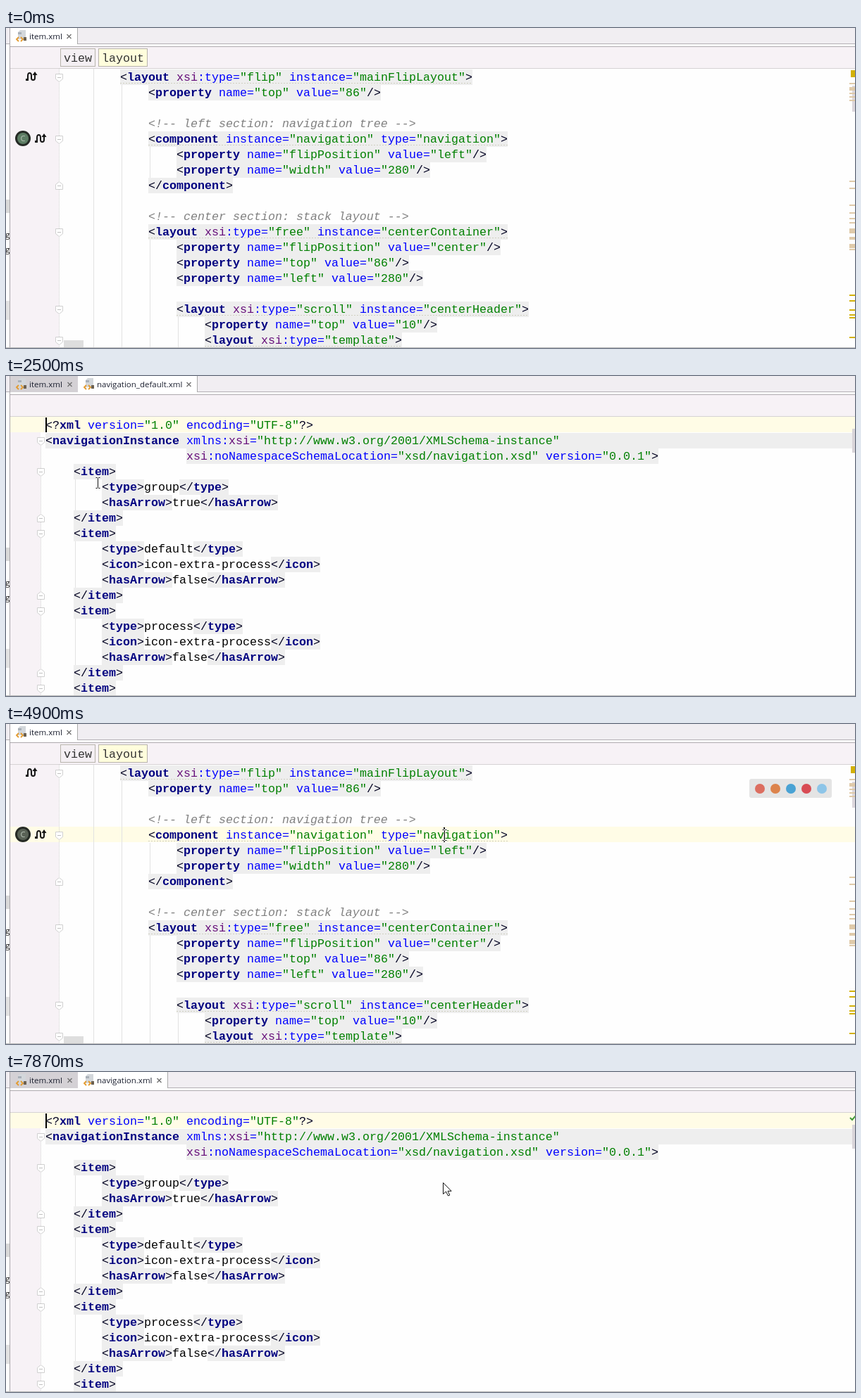
These frames come from a looping animation (1205 by 455 pixels, 8 s). An HTML page with a canvas:

```html
<!DOCTYPE html>
<html lang="en">
<head>
<meta charset="utf-8">
<title>XML editor navigation</title>
<style>
  html, body { margin: 0; width: 100%; height: 100%; overflow: hidden; background: #fff; }
  canvas { display: block; }
</style>
</head>
<body>
<canvas id="stage" width="1205" height="455"></canvas>
<script>
const LOOP = 8000, ROW = 22, TOP = 59, CHAR = 10, RIGHT = 1205, BOTTOM = 454;
const c = document.getElementById('stage').getContext('2d');
const MONO = '16.66px "Liberation Mono", monospace';
const UI = '11.5px "Open Sans", sans-serif';
const GREY = '#eeeeee', BAND = '#fffce6', GUTTER = '#f7f2f6', EDITOR = '#fefefe';

const layoutDoc = {
  x: 162, fold: 75,
  lines: `<layout xsi:type="flip" instance="mainFlipLayout">
    <property name="top" value="86"/>

    <!-- left section: navigation tree -->
    <component instance="navigation" type="navigation">
        <property name="flipPosition" value="left"/>
        <property name="width" value="280"/>
    </component>

    <!-- center section: stack layout -->
    <layout xsi:type="free" instance="centerContainer">
        <property name="flipPosition" value="center"/>
        <property name="top" value="86"/>
        <property name="left" value="280"/>

        <layout xsi:type="scroll" instance="centerHeader">
            <property name="top" value="10"/>
            <layout xsi:type="template">`.split('\n'),
  guides: [[124, 58, 454], [164, 81, 454], [204, 169, 213], [204, 301, 454], [244, 411, 454]],
  opens: [70, 158, 290, 400, 444], closes: [224]
};

const item = (type, icon, arrow) => [
  '    <item>', `        <type>${type}</type>`,
  ...(icon ? [`        <icon>${icon}</icon>`] : []),
  `        <hasArrow>${arrow}</hasArrow>`, '    </item>'
];
const navDoc = {
  x: 56, fold: 49,
  lines: [
    '<?xml version="1.0" encoding="UTF-8"?>',
    '<navigationInstance xmlns:xsi="http://www.w3.org/2001/XMLSchema-instance"',
    ' '.repeat(20) + 'xsi:noNamespaceSchemaLocation="xsd/navigation.xsd" version="0.0.1">',
    ...item('group', '', true),
    ...item('default', 'icon-extra-process', false),
    ...item('process', 'icon-extra-process', false),
    '    <item>'
  ],
  guides: [[98, 147, 191], [98, 235, 301], [98, 345, 411]],
  opens: [92, 136, 224, 334, 444], closes: [202, 312, 422]
};

// time, x, y, pointer shape
const pointerSteps = [
  [0, 0, 0, ''], [450, 1022, 445, 'beam'], [530, 829, 411, 'beam'], [690, 520, 300, 'beam'],
  [770, 385, 254, 'beam'], [1000, 355, 250, 'beam'], [1080, 290, 240, 'beam'],
  [1160, 220, 226, 'beam'], [1240, 177, 215, 'beam'], [1400, 120, 196, 'beam'],
  [1480, 60, 178, 'arrow'], [1560, 26, 161, 'arrow'], [1790, 24, 161, 'hand'],
  [2130, 21, 158, 'hand'], [2420, 25, 160, 'arrow'], [2500, 130, 152, 'beam'],
  [2580, 270, 142, 'beam'], [2660, 410, 132, 'beam'], [2740, 530, 123, 'beam'],
  [2820, 620, 118, 'beam'], [2890, 653, 116, 'beam'], [3040, 600, 104, 'beam'],
  [3120, 460, 76, 'beam'], [3200, 320, 48, 'arrow'], [3280, 251, 28, 'arrow'],
  [3360, 258, 10, 'arrow'], [4160, 330, 40, 'arrow'], [4240, 420, 90, 'beam'],
  [4320, 510, 140, 'beam'], [4400, 580, 180, 'beam'], [4480, 603, 194, 'beam'],
  [4680, 614, 174, 'beam'], [4760, 622, 158, 'beam'], [7130, 620, 157, 'arrow']
];
const toolbarSteps = [
  [0, 0], [1000, .3], [1080, .5], [1160, .75], [1240, 1], [2280, 0],
  [4680, .3], [4760, .5], [4900, .8], [5020, 1], [7210, 0]
];
const spinnerSteps = [[0, 0], [7210, 1], [7490, 4], [7590, 5]];
const at = (steps, t) => steps.filter(s => s[0] <= t).pop();

function box(x, y, w, h, fill) { c.fillStyle = fill; c.fillRect(x, y, w, h); }
function frame(x, y, w, h, fill, stroke) {
  box(x, y, w, h, fill);
  c.strokeStyle = stroke; c.lineWidth = 1;
  c.strokeRect(x + .5, y + .5, w - 1, h - 1);
}
function text(s, x, y, font, color) { c.font = font; c.fillStyle = color; c.fillText(s, x, y); }
function disc(x, y, r, fill) { c.fillStyle = fill; c.beginPath(); c.arc(x, y, r, 0, 7); c.fill(); }
function shape(d, x, y, fill, stroke, width = 1) {
  const p = new Path2D(d);
  c.save(); c.translate(x, y);
  if (fill) { c.fillStyle = fill; c.fill(p); }
  if (stroke) { c.strokeStyle = stroke; c.lineWidth = width; c.stroke(p); }
  c.restore();
}

// Colours one line of XML; a line always begins inside a tag.
function tokens(line) {
  const list = [], re = /<!--.*-->|<\?|<\/?|\/?>|\?>|"[^"]*"|\s+|\bxsi\b|:?[\w.-]+:?|=/g;
  let tag = true, named = false;
  for (const m of line.matchAll(re)) {
    const s = m[0], tok = { s, col: m.index, color: '#0000ff', style: '', tag: true };
    if (s.startsWith('<!--')) Object.assign(tok, { color: '#808080', style: 'italic ', tag: false });
    else if (s[0] === '<') { tag = true; named = true; tok.color = '#000020'; }
    else if (s.endsWith('>')) { tag = false; tok.color = '#000020'; }
    else if (!s.trim()) tok.tag = tag && m.index > 0;
    else if (!tag) { tok.color = '#000'; tok.tag = false; }
    else if (s[0] === '"') tok.color = '#008000';
    else if (named) { named = false; tok.color = '#000080'; tok.style = 'bold '; }
    else if (s === 'xsi') tok.color = '#660e7a';
    list.push(tok);
  }
  return list;
}
for (const doc of [layoutDoc, navDoc]) doc.tokens = doc.lines.map(tokens);

function foldMark(x, y, up) {
  const k = up ? -1 : 1;
  shape(`M-5,${-5 * k}H5V${2 * k}L0,${6 * k}L-5,${2 * k}Z`, x + .5, y + .5, '#fff', '#d0d0d0');
  box(x - 2, y, 5, 1, '#c0c0c0');
}

function drawDoc(doc, v) {
  box(6, 58, doc.fold - 6, 396, GUTTER);
  box(doc.fold, 58, RIGHT - doc.fold, 396, EDITOR);
  if (v.band >= 0) box(6, TOP + v.band * ROW - 1, RIGHT - 6, ROW, BAND);
  doc.tokens.forEach((row, i) => {
    const y = TOP + i * ROW;
    if (i !== v.band) for (const k of row)
      if (k.tag) box(doc.x + k.col * CHAR, y, k.s.length * CHAR, ROW, GREY);
  });
  if (doc === navDoc) box(785, 81, RIGHT - 785, ROW, GREY);
  if (v.guides) for (const [x, a, b] of doc.guides) box(x, a, 1, b - a, '#e2e2e2');
  for (const [x, y, w, color] of v.marks) box(x, y, w, ROW, color);
  c.strokeStyle = '#d0d0d0'; c.lineWidth = 1; c.setLineDash([1, 1]);
  c.beginPath(); c.moveTo(doc.fold + .5, doc === navDoc ? 92 : 58); c.lineTo(doc.fold + .5, BOTTOM); c.stroke();
  c.setLineDash([]);
  doc.opens.forEach(y => foldMark(doc.fold, y));
  doc.closes.forEach(y => foldMark(doc.fold, y, true));
  doc.tokens.forEach((row, i) => {
    for (const k of row) text(k.s, doc.x + k.col * CHAR, 75 + i * ROW, k.style + MONO, k.color);
    if (doc === layoutDoc && /<(layout|component) /.test(doc.lines[i])) {
      const start = doc.lines[i].search(/\S/);
      c.strokeStyle = '#cfcfc0'; c.setLineDash([2, 2]);
      c.beginPath();
      c.moveTo(doc.x + start * CHAR, 78.5 + i * ROW);
      c.lineTo(doc.x + doc.lines[i].length * CHAR, 78.5 + i * ROW);
      c.stroke(); c.setLineDash([]);
    }
  });
}

function tab(x, w, name, active) {
  box(x, 0, w, 23, active ? '#fff' : '#d4d1d5');
  box(x + w - 1, 0, 1, 23, '#aaa');
  const ix = x + 9;
  shape('M5,0H13V13H2V3Z', ix, 3, '#d3d7db');
  box(ix + 2, 6, 5, 3, '#a9b0b8');
  shape('M4,9L1,12L4,15M7,9L10,12L7,15', ix - 1, 4, '', '#e39a2d', 1.8);
  box(ix + 10, 13, 4, 5, '#6d6252');
  text(name, x + 27, 16, UI, '#1c2030');
  shape('M-3,-3L3,3M3,-3L-3,3', x + w - 12.5, 12, '', '#707070', 1.4);
}

function crumbs(x, list) {
  for (const [name, fill] of list) {
    const w = name.length * CHAR + 10;
    frame(x, 29, w, 26, fill, '#b8b4ac');
    text(name, x + 5, 48, MONO, '#333');
    x += w + 4;
  }
}

function chrome() {
  box(0, 0, RIGHT, 455, '#fff');
  box(0, 0, RIGHT, 23, '#f1eef2');
  box(0, 22, RIGHT, 1, '#b3b0b4');
  box(6, 26, RIGHT - 6, 1, '#aeaaae');
  box(6, 27, RIGHT - 6, 30, GUTTER);
  box(6, 57, RIGHT - 6, 1, '#d6d2d4');
  box(0, 244, 5, 19, '#d9d9d9');
  box(0, 388, 5, 27, '#e2e2e2');
  text('g', -1, 298, UI, '#111');
  text('g', -1, 319, UI, '#111');
  box(5, 0, 1, 455, '#a9a6aa');
}

function gutterArrows(x, y) {
  shape('M-5,5V-1Q-5,-5 -2.5,-5Q0,-5 0,-1V2Q0,5 2.5,5Q5,5 5,2V-3', x, y, '', '#151515', 2);
  shape('M1.5,-2L5,-7L8.5,-2Z', x, y, '#151515');
  box(x - 8, y + 3, 4, 3, '#151515');
}

function classIcon(color) {
  disc(24, 157, 11, '#252a25');
  disc(24, 157, 8, color);
  c.textAlign = 'center';
  text('C', 24, 161, '11px "Open Sans", sans-serif', '#b9c4b8');
  c.textAlign = 'left';
}

function errorStripe() {
  box(1199, 60, 6, 10, '#d3b106');
  box(1201, 82, 4, 37, '#dcd7dc');
  for (const [y, h] of [[78, 2], [84, 5], [92, 2], [97, 2], [102, 2], [217, 2], [227, 2], [251, 2],
    [262, 2], [270, 2], [276, 2], [285, 7], [297, 4], [307, 6], [314, 2]])
    box(1197, y, 8, h, '#dfcaa9');
  for (const y of [379, 387, 400, 407, 411, 439]) box(1197, y, 8, 2, '#d3b106');
}

function browserBar(alpha) {
  c.globalAlpha = alpha;
  c.fillStyle = '#dedede';
  c.beginPath(); c.roundRect(1055, 78, 117, 27, 3); c.fill();
  ['#d9503f', '#d96a26', '#2291d0', '#d42430', '#77bde8']
    .forEach((color, i) => disc(1070 + i * 22, 92, 7, color));
  c.globalAlpha = 1;
}

function bulb(x, y) {
  disc(x + 5.5, y + 5.5, 5.3, '#f0a732');
  disc(x + 4.5, y + 4.5, 2.4, '#f9cd78');
  box(x + 3, y + 10, 5, 2, '#9a8a70');
  box(x + 3, y + 13, 5, 2, '#77716a');
}

function declarationPopup() {
  frame(621, 169, 425, 55, '#fff', '#a5a5a5');
  box(622, 170, 423, 17, '#e6e6e6');
  c.textAlign = 'center';
  text('Choose Declaration', 833, 182, UI, '#222');
  c.textAlign = 'left';
  text('navigation.xml', 630, 200, UI, '#222');
  text('navigation_default.xml', 630, 217, UI, '#222');
}

function spinner(turn) {
  for (let i = 0; i < 12; i++) {
    const a = (i + turn) * Math.PI / 6, shade = 105 + i * 11;
    c.strokeStyle = `rgb(${shade},${shade},${shade})`;
    c.lineWidth = 3.4; c.lineCap = 'round';
    c.beginPath();
    c.moveTo(548 - Math.cos(a) * 8.5, 240 + Math.sin(a) * 8.5);
    c.lineTo(548 - Math.cos(a) * 14, 240 + Math.sin(a) * 14);
    c.stroke();
  }
  c.lineCap = 'butt';
}

function pointer([, x, y, kind]) {
  if (kind === 'arrow') shape('M0,0V16L4,12.5L7,18.5L9.3,17.5L6.6,11.8H11.6Z', x + .5, y + .5, '#fff', '#111');
  if (kind === 'beam') {
    const beam = 'M-3,-7.5H-1L0,-6.5L1,-7.5H3M0,-6.5V6.5M-3,7.5H-1L0,6.5L1,7.5H3';
    shape(beam, x + .5, y, '', '#fff', 2.4);
    shape(beam, x + .5, y, '', '#111');
  }
  if (kind === 'hand') {
    shape('M4,12V2Q4,0 5.5,0Q7,0 7,2V8Q7,6.5 8.5,6.5Q10,6.5 10,8Q10,7 11.5,7Q13,7 13,9' +
      'Q13,8 14.2,8Q15.5,8 15.5,10V14Q15.5,17 13.5,19V21.5H5.5V19L1,13Q0,11 1.2,10.5Q2.5,10 4,12Z', x, y, '#fff', '#111', 1.2);
    shape('M7,8V12M10,8V12M13,9V12', x, y, '', '#111');
  }
}

function drawLayout(t) {
  const clicked = t >= 4900, matched = t >= 5320;
  const marks = matched
    ? [[162, 59, 70, '#fdfbe0'], [202, 147, 100, '#ffe6e4'], [202, 213, 120, '#ffe6e4']] : [];
  tab(6, 96, 'item.xml', true);
  drawDoc(layoutDoc, { band: clicked ? 4 : -1, guides: true, marks });
  crumbs(77, t >= 5090
    ? [['view', '#e0f8f6'], ['layout', '#e1f7dd'], ['layout', '#f9f9da'], ['component', '#ffe1c4']]
    : [['view', '#f4eff3'], ['layout', '#fffddc']]);
  if (matched) {
    box(64, 58, 2, 396, '#f4e8a6');
    box(64, 147, 2, 88, '#ee8080');
  }
  gutterArrows(36, 69);
  gutterArrows(49, 157);
  classIcon(t < 2280 ? '#5d7d64' : '#596256');
  errorStripe();
  box(82, 444, 28, 10, '#dedede');
  browserBar(at(toolbarSteps, t)[1]);
  if (clicked) box(621, 147, 2, 21, '#000');
  if (t >= 5790 && t < 6020) bulb(91, 147);
  if (t >= 6130 && t < 6900) declarationPopup();
}

function drawNav(t) {
  const first = t < 3590, clicked = first && t >= 2890;
  const name = first ? 'navigation_default.xml' : 'navigation.xml';
  tab(6, 97, 'item.xml', false);
  tab(102, first ? 170 : 128, name, true);
  drawDoc(navDoc, {
    band: clicked ? 2 : 0,
    guides: t >= (first ? 2420 : 7490),
    marks: clicked ? [[606, 103, 140, '#eeecf8']] : []
  });
  if (first && t >= 3040) {
    crumbs(51, [['navigationInstance', '#fffddc']]);
    bulb(65, 103);
  }
  if (!clicked) box(56, 59, 2, 21, '#000');
  box(1201, 75, 4, 34, '#d9d5d9');
  if (t >= (first ? 2820 : 7870)) shape('M0,3L3,6L8,0', 1198, 62, '', '#3f9b36', 2);
}

function draw(t) {
  chrome();
  if ((t >= 2280 && t < 3590) || t >= 7210) drawNav(t);
  else drawLayout(t);
  if (t >= 7130 && t < 7870) spinner(at(spinnerSteps, t)[1]);
  pointer(at(pointerSteps, t));
  box(0, BOTTOM, RIGHT, 1, '#b9b9b9');
}

const start = performance.now();
function tick() {
  draw((performance.now() - start) % LOOP);
  requestAnimationFrame(tick);
}
tick();
</script>
</body>
</html>
```
